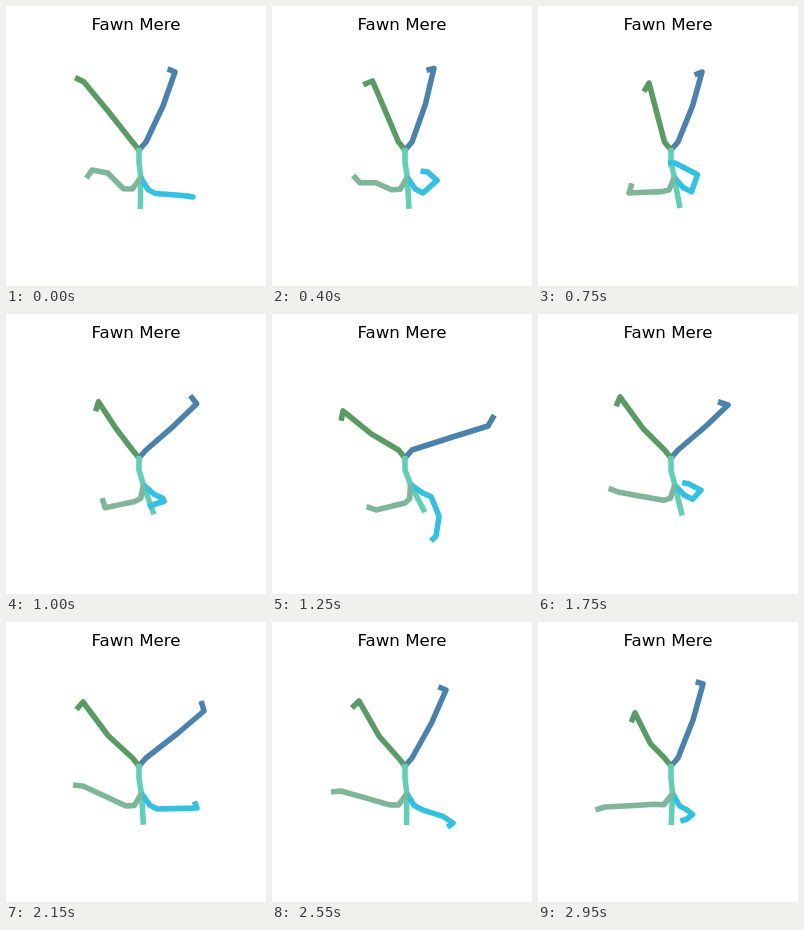
An HTML page with a canvas for the animation above (3000 ms loop, 260x280 px).

```html
<!DOCTYPE html>
<html lang="en">
<head>
<meta charset="utf-8">
<title>Fawn Mere</title>
<style>
  html, body { margin: 0; width: 260px; height: 280px; overflow: hidden; background: #fff; }
  canvas { display: block; }
  h1 {
    position: absolute; top: 8.5px; left: 0; width: 260px; margin: 0;
    font: 400 16.67px/20px "DejaVu Sans", sans-serif;
    text-align: center; color: #000;
  }
</style>
</head>
<body>
<h1>Fawn Mere</h1>
<canvas id="stage" width="260" height="280"></canvas>
<script>
const ctx = document.getElementById('stage').getContext('2d');
const LOOP = 3000, STEP = 50;
const times = [0, 750, 1250, 1750, 2150, 2550, 2950];

// Key poses of each wrist or ankle: x, y, and the direction of hand or foot in degrees
const keys = {
  rightArm: [[169, 66, 203], [164, 66, 158], [216, 112, 300], [190, 91, 198],
    [198, 89, 254], [174, 68, 203], [165, 62, 198]],
  leftArm: [[78, 76, 207], [111, 77, 121], [71, 97, 101], [82, 83, 112],
    [77, 80, 131], [87, 79, 135], [97, 91, 112]],
  rightLeg: [[187, 191, 190], [137, 157, 180], [164, 222, 135], [151, 170, 193],
    [191, 186, 248], [181, 201, 143], [149, 197, 162]],
  leftLeg: [[86, 164, 124], [91, 187, 287], [104, 196, 200], [80, 178, 201],
    [77, 164, 186], [69, 169, 174], [67, 185, 163]]
};

const mid = (a, b, dx = 0, dy = 0) => [(a[0] + b[0]) / 2 + dx, (a[1] + b[1]) / 2 + dy];
const shift = (p, dx, dy) => [p[0] + dx, p[1] + dy];

function tip(p, length) {
  const a = p[2] * Math.PI / 180;
  return shift(p, length * Math.cos(a), length * Math.sin(a));
}

function slope(path, i, c) {
  const a = Math.max(i - 1, 0), b = Math.min(i + 1, path.length - 1);
  return (path[b][c] - path[a][c]) / (times[b] - times[a]);
}

// Smooth cubic through the key poses
function pose(path, t) {
  let i = 0;
  while (i < times.length - 2 && t >= times[i + 1]) i++;
  const span = times[i + 1] - times[i];
  const u = (t - times[i]) / span, v = 1 - u;
  return path[i].map((p, c) =>
    p * v * v * (1 + 2 * u) + path[i + 1][c] * u * u * (3 - 2 * u) +
    span * (slope(path, i, c) * u * v * v - slope(path, i + 1, c) * u * u * v));
}

function limb(color, ...points) {
  ctx.strokeStyle = color;
  ctx.beginPath();
  for (const [x, y] of points) ctx.lineTo(x, y);
  ctx.stroke();
}

function drawArms(t) {
  const neck = [133, 144], right = [140, 136], left = [126.5, 136];

  const rWrist = pose(keys.rightArm, t);
  limb('#4a82ac', neck, right, mid(right, rWrist, 2.5, -1), rWrist,
    tip(rWrist, 8 + 0.1 * (rWrist[1] - 66)));

  // The left elbow sags slowly over the loop
  const lWrist = pose(keys.leftArm, t);
  limb('#5a9a64', neck, left, mid(left, lWrist, 0.5, 8 * t / LOOP), lWrist, tip(lWrist, 10));
}

function drawBody(t) {
  const sway = 22 / (1 + ((t - 1300) / 550) ** 2) - 2;
  const tail = [133 + sway, 203 - 0.012 * sway ** 2];
  const root = [134.5 + 0.2 * sway, 171.5 - 0.003 * sway ** 2];
  const tilt = tail[0] - root[0];
  limb('#62ceb6', [133, 142], [133, 156], root, mid(root, tail), tail);

  // The right knee points outward, more so when the foot is raised
  const rHip = shift(root, 7.5 + 0.3 * tilt, 12 - 0.25 * tilt);
  const rThigh = shift(rHip, 7.5 + 0.1 * tilt, 4);
  const rAnkle = pose(keys.rightLeg, t);
  const rLift = Math.max(0, rThigh[1] - rAnkle[1]);
  limb('#34c0e0', root, rHip, rThigh, mid(rThigh, rAnkle, 5.5 + 0.3 * rLift, -0.1 * rLift),
    rAnkle, tip(rAnkle, 7));

  // The left knee rises when the leg is lifted and drawn in
  const lHip = shift(root, -8 + 0.5 * tilt, 11.5 + 0.2 * tilt);
  const lThigh = shift(lHip, -9 + 0.3 * tilt, 0.3 * tilt);
  const lAnkle = pose(keys.leftLeg, t);
  const lLift = Math.max(0, lThigh[1] - lAnkle[1]);
  const drawnIn = Math.max(0, 45 - Math.hypot(lThigh[0] - lAnkle[0], lLift));
  limb('#7fb69a', root, lHip, lThigh, mid(lThigh, lAnkle, 0, -0.04 * lLift * drawnIn),
    lAnkle, tip(lAnkle, 10));
}

function draw(t) {
  ctx.clearRect(0, 0, 260, 280);
  ctx.lineWidth = 5.56;
  ctx.lineJoin = 'round';
  drawArms(t);
  drawBody(t);
}

const start = performance.now();
function tick() {
  const t = (performance.now() - start) % LOOP;
  draw(Math.floor(t / STEP) * STEP);
  requestAnimationFrame(tick);
}
tick();
</script>
</body>
</html>
```
